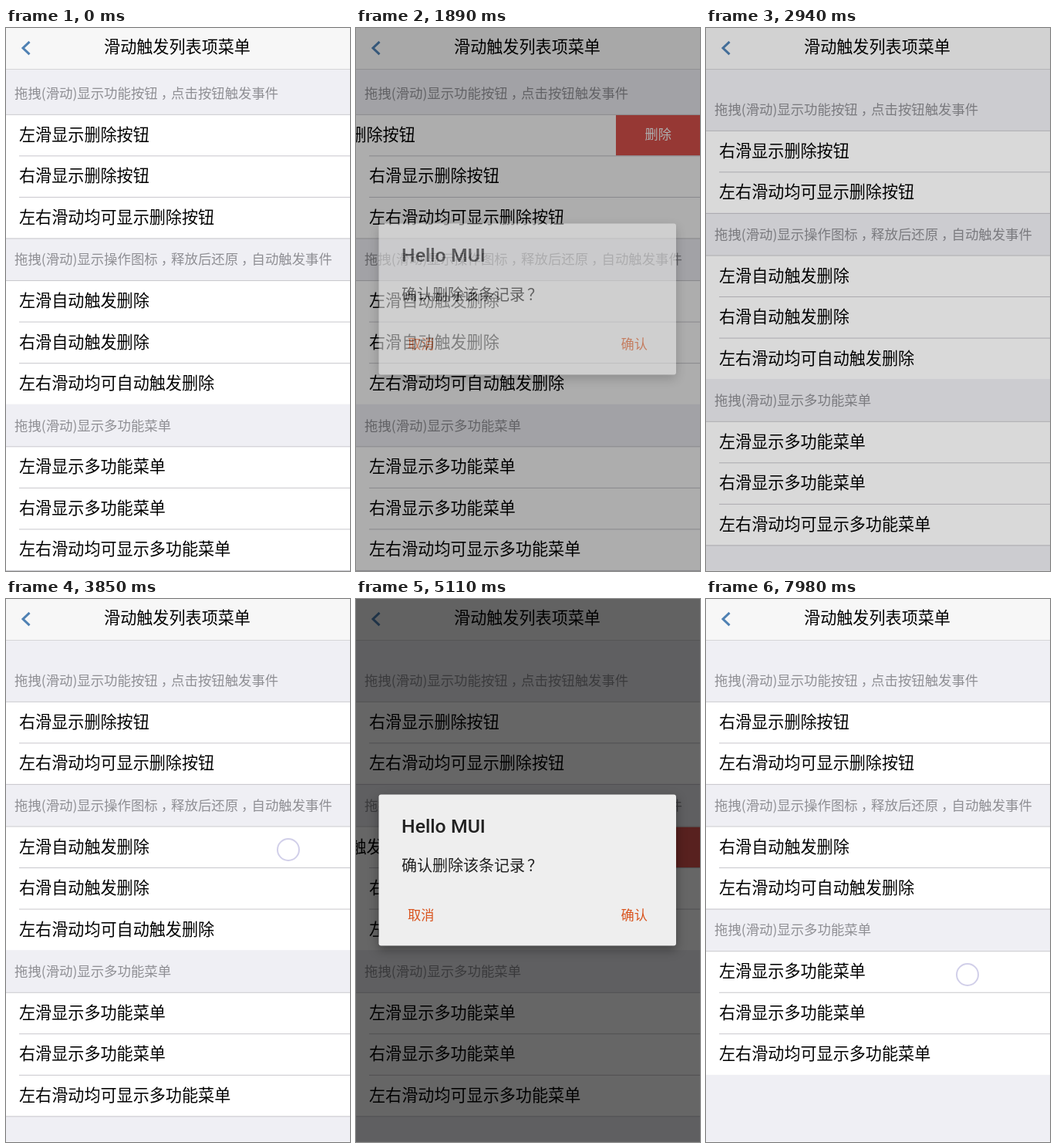
These frames come from a looping animation (446 by 704 pixels, 8000 ms). An HTML page:

```html
<!DOCTYPE html>
<html lang="zh-CN">
<head>
<meta charset="utf-8">
<title>滑动触发列表项菜单</title>
<style>
html, body { margin: 0; width: 100%; height: 100%; overflow: hidden; background: #efeff4; }
svg { display: block; width: 446px; height: 704px; }
text { font-family: "Noto Sans CJK SC", "Noto Sans CJK", sans-serif; white-space: pre; }
.latin { font-family: Roboto, sans-serif; font-weight: 500; }
</style>
</head>
<body>
<svg viewBox="0 0 446 704">
  <g id="page"></g>
  <rect width="446" height="54" fill="#f7f7f7"/>
  <rect y="53" width="446" height="1" fill="#d6d6d8"/>
  <path d="M30.5 17.8 22 26l8.5 8.2" fill="none" stroke="#4f81b3" stroke-width="3"/>
  <text x="222" y="32.3" font-size="21.1" text-anchor="middle">滑动触发列表项菜单</text>
  <rect id="dim" width="446" height="704"/>
  <g id="dialog">
    <rect x="29.5" y="253.5" width="385.5" height="196" rx="3" fill="#eee" style="filter:drop-shadow(0 5px 7px rgba(0,0,0,.35))"/>
    <text class="latin" x="59" y="302.5" font-size="24.8" fill="#212121">Hello MUI</text>
    <text x="59" y="353.4" font-size="20" fill="#212121">确认删除该条记录<tspan dx="3">？</tspan></text>
    <g font-size="17.2" font-weight="500" fill="#d9541e">
      <text x="67" y="416.2">取消</text>
      <text x="343.5" y="416.2">确认</text>
    </g>
  </g>
  <g id="touch">
    <circle r="13.5" fill="#fff" fill-opacity=".42"/>
    <circle r="14" fill="none" stroke="#8c88c8" stroke-opacity=".4" stroke-width="2"/>
  </g>
</svg>
<script>
const LOOP = 8000, STEP = 70;
const ROW = 53.55, HEAD = 54.6, SCROLL = 21, LINE = '#c8c7cc';
const PULL = 150, BUTTON = 109, RELEASE = 140; // px, px, ms
const FADE_IN = 450, FADE_OUT = 280;
const el = id => document.getElementById(id);
const clamp = v => Math.min(1, Math.max(0, v));
const ease = p => p * p * (3 - 2 * p);

const groups = [
  ['拖拽(滑动)显示功能按钮，点击按钮触发事件', '左滑显示删除按钮', '右滑显示删除按钮', '左右滑动均可显示删除按钮'],
  ['拖拽(滑动)显示操作图标，释放后还原，自动触发事件', '左滑自动触发删除', '右滑自动触发删除', '左右滑动均可自动触发删除'],
  ['拖拽(滑动)显示多功能菜单', '左滑显示多功能菜单', '右滑显示多功能菜单', '左右滑动均可显示多功能菜单']
];

// A finger that lands, moves by dx, dy while held, then fades
const finger = (at, hold, x, y, dx = 0, dy = 0) => ({ at, hold, x, y, dx, dy });

// Swipe a row, open the dialog, confirm
const rounds = [
  { swipe: finger(770, 420, 380, 150, -150, 8), open: 1650, close: 2730 },
  { swipe: finger(3850, 630, 366, 325, -176, -48), open: 4660, close: 6440 }
];
const fingers = [
  ...rounds.map(r => r.swipe),
  finger(1610, 140, 392, 140),
  finger(2380, 420, 372, 424),
  finger(6510, 210, 354, 414),
  finger(7910, 70, 354, 487, -15)
];

function rowSlide(t, { at, hold }) {
  const drag = ease(clamp((t - at) / hold)), settle = ease(clamp((t - at - hold) / RELEASE));
  return -PULL * drag + (PULL - BUTTON) * settle;
}

const rect = (x, y, w, h, fill) => `<rect x="${x}" y="${y}" width="${w}" height="${h}" fill="${fill}"/>`;
// Commas sit in the middle of their cell
const commas = str => str.replace(/，(.)/g, '<tspan dx="4">，</tspan><tspan dx="-4">$1</tspan>');
const label = (x, mid, size, fill, str) =>
  `<text x="${x}" y="${mid + size * .37}" font-size="${size}" fill="${fill}">${commas(str)}</text>`;

function drawPage(removed, slide) {
  let y = 111.8 + (removed ? SCROLL : 0);
  const bare = removed === 2 ? 2 : 1; // group without a bottom line
  let out = rect(0, 0, 446, 704, '#efeff4') + rect(0, 703, 446, 1, '#f8f8fa');
  groups.forEach(([head, ...rows], g) => {
    if (g < removed) rows.shift();
    const h = rows.length * ROW;
    out += label(11, y - 27.2, 17.4, '#8f8f94', head) + rect(0, y, 446, h, '#fff');
    rows.forEach((str, i) => {
      const top = y + i * ROW, dx = g === removed && i === 0 ? slide : 0;
      if (i) out += rect(17, top, 429, 1, LINE);
      out += label(17 + dx, top + 26.2, 21.1, '#000', str);
      if (dx) out += rect(446 + dx, top + 1, -dx, ROW - 1, '#dd524d') +
        label(483.5 + dx, top + 26.2, 17.2, '#fff', '删除');
    });
    out += rect(0, y, 446, 1, LINE);
    y += h;
    if (g !== bare) out += rect(0, y, 446, 1, LINE);
    y += HEAD;
  });
  return out;
}

let pageState = '';
function drawList(t) {
  const removed = rounds.filter(r => t > r.close).length;
  const slide = removed < rounds.length ? rowSlide(t, rounds[removed].swipe) : 0;
  const state = removed + ':' + slide;
  if (state === pageState) return;
  pageState = state;
  el('page').innerHTML = drawPage(removed, slide);
}

function drawDialog(t) {
  let shade = 0, alpha = 0;
  for (const { open, close } of rounds) {
    const shown = clamp((t - open) / FADE_IN), left = 1 - clamp((t - close) / FADE_OUT);
    shade += .6 * shown * left;
    alpha += shown * left ** 4.8; // the box leaves faster than the shade
  }
  el('dim').setAttribute('opacity', shade);
  el('dialog').setAttribute('opacity', alpha);
}

function drawTouch(t) {
  const f = fingers.find(f => t >= f.at && t < f.at + f.hold + RELEASE);
  el('touch').setAttribute('opacity', f ? 1 - clamp((t - f.at - f.hold) / RELEASE) : 0);
  if (!f) return;
  const p = ease(clamp((t - f.at) / f.hold));
  el('touch').setAttribute('transform', `translate(${f.x + f.dx * p} ${f.y + f.dy * p})`);
}

const start = performance.now();
function tick() {
  const now = (performance.now() - start) % LOOP;
  const t = Math.floor(now / STEP) * STEP;
  drawList(t);
  drawDialog(t);
  drawTouch(t);
  requestAnimationFrame(tick);
}
tick();
</script>
</body>
</html>
```
